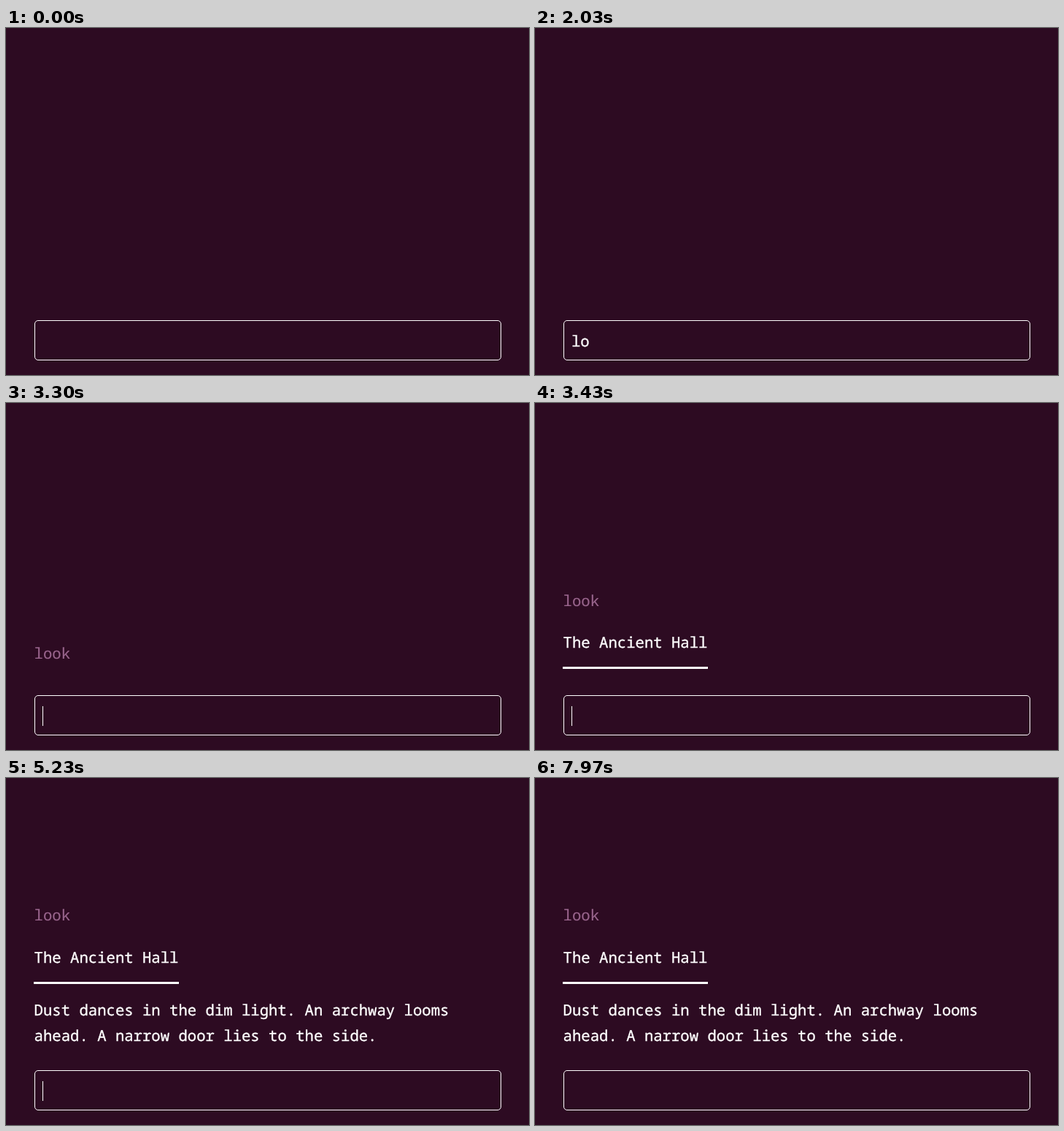
An HTML page for the animation above (8000 ms loop, 717 px wide and 475 px high).

```html
<!DOCTYPE html>
<html lang="en">
<head>
<meta charset="utf-8">
<title>Text adventure</title>
<style>
  html, body { margin: 0; width: 100%; height: 100%; overflow: hidden; background: #2d0b22; }
  body {
    position: relative;
    color: #fff;
    font: 500 20.62px/28px "Noto Sans Mono", "DejaVu Sans Mono", monospace;
    text-rendering: geometricPrecision;
    -webkit-text-stroke: 0.35px;
  }
  body * { position: absolute; top: 0; left: 0; box-sizing: border-box; white-space: nowrap; }

  .prompt { left: 39px; top: 400px; width: 640px; height: 55px; border: 1px solid #fff; border-radius: 5px; }
  .typed { left: 50px; top: 415px; height: 28px; overflow: hidden; }
  .caret { left: 50px; top: 415px; width: 1px; height: 27px; background: #fff; }

  .line { left: 38.6px; }
  .echo { top: 174px; color: #9a668e; -webkit-text-stroke-width: 0.15px; }
  .title { top: 232px; }
  .rule { left: 38px; top: 279px; width: 199px; height: 3px; background: #fff; }
  .text1 { top: 304px; }
  .text2 { top: 339px; }

  .typed, .caret, .echo, .heading, .story { animation: 8s step-end infinite; }
  .typed { animation-name: type; }
  .caret { animation-name: blink; }
  .echo { animation-name: echo; }
  .heading { animation-name: heading; }
  .story { animation-name: story; }

  @keyframes type {
    0% { width: 0; }
    20.375% { width: 1ch; }
    25.375% { width: 2ch; }
    28.75% { width: 3ch; }
    32.125% { width: 4ch; }
    41.25%, 100% { width: 0; }
  }
  @keyframes blink {
    0%, 12.125%, 45.375%, 58.75%, 72.125%, 86.25%, 99.625%, 100% { opacity: 0; transform: none; }
    6.25%, 18.75%, 41.25%, 52.125%, 65.375%, 78.75%, 92.125% { opacity: 1; transform: none; }
    20.375% { opacity: 1; transform: translateX(12px); }
    25.375% { opacity: 0; transform: translateX(25px); }
    28.75% { opacity: 1; transform: translateX(37px); }
    32.125% { opacity: 0; transform: translateX(49px); }
    38.75% { opacity: 1; transform: translateX(49px); }
  }
  @keyframes echo {
    0% { opacity: 0; transform: none; }
    41.25% { opacity: 1; transform: translateY(155px); }
    42.875% { opacity: 1; transform: translateY(83px); }
    43.75%, 100% { opacity: 1; transform: none; }
  }
  @keyframes heading {
    0% { opacity: 0; transform: none; }
    42.875% { opacity: 1; transform: translateY(82px); }
    43.75%, 100% { opacity: 1; transform: none; }
  }
  @keyframes story {
    0% { opacity: 0; }
    43.75%, 100% { opacity: 1; }
  }
</style>
</head>
<body>
<div class="line echo">look</div>
<div class="heading">
  <div class="line title">The Ancient Hall</div>
  <div class="rule"></div>
</div>
<div class="story">
  <div class="line text1">Dust dances in the dim light. An archway looms</div>
  <div class="line text2">ahead. A narrow door lies to the side.</div>
</div>
<div class="prompt"></div>
<div class="typed">look</div>
<div class="caret"></div>
</body>
</html>
```
